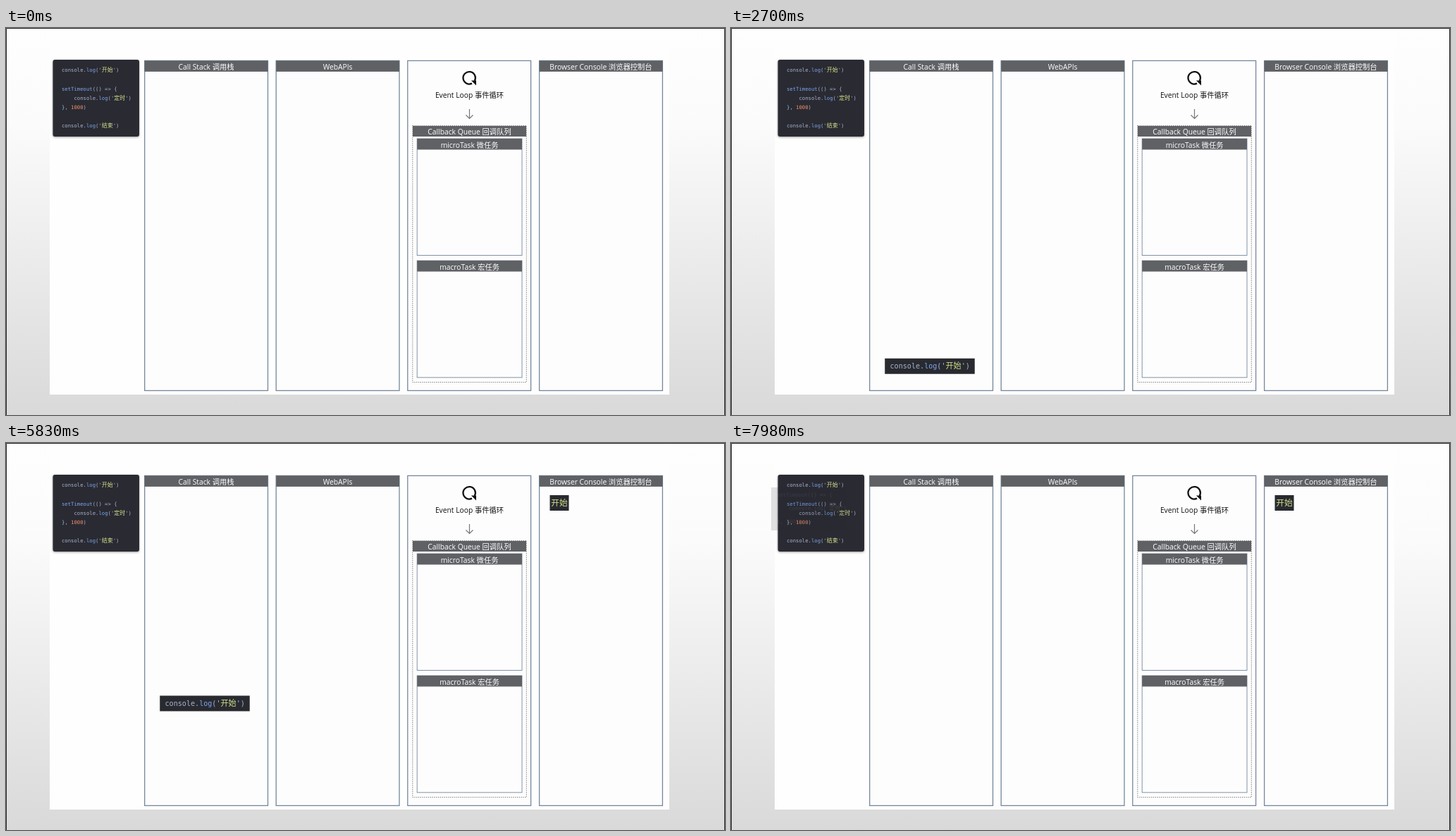
These frames come from a looping animation (1020x549 px, 8 s). An HTML page:

```html
<!DOCTYPE html>
<html lang="zh">
<head>
<meta charset="utf-8">
<style>
  html, body { margin: 0; width: 100%; height: 100%; overflow: hidden; }
  svg { display: block; width: 1020px; height: 549px; }
  text { font: 10.3px "Open Sans", "Noto Sans CJK SC", "Noto Sans CJK", sans-serif; }
  .code text { font: 7.25px "DejaVu Sans Mono", "Noto Sans CJK SC", "Noto Sans CJK", monospace; fill: #a6b3cd; }
  .code.chip text { font-size: 10.1px; }
  .code .fn { fill: #7ba7ee; }
  .code .str { fill: #d3e08c; font-size: 1.1em; }
  .code .quote { fill: #8ccbe8; }
  .code .num { fill: #f08f6c; }
  .box { fill: #fdfdfd; stroke: #75879c; }
  .band { fill: #5f6165; }
  .panel { fill: #292a30; }
</style>
</head>
<body>
<svg id="stage" viewBox="0 0 1020 549"></svg>
<script>
const log = word =>
  `console.<tspan class="fn">log</tspan>(<tspan class="quote">'</tspan><tspan class="str">${word}</tspan><tspan class="quote">'</tspan>)`;
const timer = '<tspan class="fn">setTimeout</tspan>(() =&gt; {';
const timerEnd = '<tspan class="quote">}</tspan>, <tspan class="num">1000</tspan>)';

const rect = (x, y, w, h, cls, extra = '') =>
  `<rect x="${x}" y="${y}" width="${w}" height="${h}" class="${cls}" ${extra}/>`;
const label = (x, y, s, fill = '#fff') =>
  `<text x="${x}" y="${y}" text-anchor="middle" fill="${fill}">${s}</text>`;
const line = (x, y, s) => `<text x="${x}" y="${y}">${s}</text>`;

function titledBox(x, y, w, h, title, strokeWidth) {
  return rect(x, y, w, h, 'box', `stroke-width="${strokeWidth}"`) +
    (title ? rect(x, y, w, 15.5, 'band') + label(x + w / 2, y + 12.5, title) : '');
}

const columns = [[196.7, 'Call Stack 调用栈'], [383.2, 'WebAPIs'], [569.8, ''], [756.6, 'Browser Console 浏览器控制台']];

stage.innerHTML = `
  <defs>
    <linearGradient id="sky" x2="0" y2="1">
      <stop offset="0" stop-color="#fefefe"/>
      <stop offset=".25" stop-color="#fbfbfb"/>
      <stop offset="1" stop-color="#d9d9d9"/>
    </linearGradient>
    <filter id="shade"><feDropShadow dx="0" dy="1" stdDeviation="1.5" flood-opacity=".4"/></filter>
  </defs>
  <rect width="1020" height="549" fill="url(#sky)"/>
  ${rect(62, 1, 879, 519, '', 'fill="#fefefe"')}
  <path d="M.5 549V.5H1019.5V549" fill="none" stroke="#222"/>
  ${columns.map(([x, title]) => titledBox(x, 46.4, 174.8, 468, title, 1.3)).join('')}

  <path d="M661 78.6A8.7 8.7 0 1 1 664.8 75" fill="none" stroke="#111" stroke-width="2.3"/>
  <path d="M660 74.5H667V81.5Z" fill="#111"/>
  ${label(657.5, 98.5, 'Event Loop 事件循环', '#111')}
  <path d="M657.5 115V128.5M652.5 123.5L657.5 128.5L662.5 123.5" fill="none" stroke="#777" stroke-width="1.2"/>
  ${rect(576.8, 138.5, 161.5, 364, '', 'fill="none" stroke="#777" stroke-dasharray="1.3 1.5"')}
  ${rect(577, 139, 161, 15, 'band')}
  ${label(657.5, 151, 'Callback Queue 回调队列')}
  ${titledBox(583.2, 157, 148.8, 165.5, 'microTask 微任务', 0.9)}
  ${titledBox(583.2, 330, 148.8, 165.8, 'macroTask 宏任务', 0.9)}

  <g class="code">
    ${rect(66.5, 45, 122.5, 109, 'panel', 'rx="3" filter="url(#shade)"')}
    ${line(79, 62.4, log('开始'))}
    ${line(79, 88.7, timer)}
    ${line(96.5, 101.8, log('定时'))}
    ${line(79, 115, timerEnd)}
    ${line(79, 141.2, log('结束'))}
  </g>
  <g class="code" id="block">
    ${rect(57, 63, 107, 61, 'panel')}
    ${line(65, 75.5, timer)}
    ${line(82.5, 94.5, log('定时'))}
    ${line(65, 113.5, timerEnd)}
  </g>
  <g class="code chip" id="call">
    ${rect(-63.75, -11, 127.5, 22, 'panel')}
    ${line(-56.5, 3.3, log('开始'))}
  </g>
  <g class="code chip" id="output">
    ${rect(-13.5, -11, 27, 22, 'panel')}
    <text y="4.3" text-anchor="middle"><tspan class="str" style="font-size:11.7px">开始</tspan></text>
  </g>
  <path id="cursor" d="M.5 171V181L2.6 179L4.2 182L5.6 181.4L4.2 178.3H6.6Z" fill="#fff" stroke="#222" stroke-width=".8"/>`;

// Smooth curve through [time, value] points, flat at both ends.
function track(points, t) {
  const last = points.length - 1;
  if (t <= points[0][0]) return points[0][1];
  if (t >= points[last][0]) return points[last][1];
  const i = points.findIndex(p => p[0] > t) - 1;
  const slope = k => k <= 0 || k >= last ? 0 :
    (points[k + 1][1] - points[k - 1][1]) / (points[k + 1][0] - points[k - 1][0]);
  const [t0, a] = points[i], [t1, b] = points[i + 1];
  const d = t1 - t0, u = (t - t0) / d, v = 1 - u;
  return a * (1 + 2 * u) * v * v + b * (3 - 2 * u) * u * u + d * u * v * (slope(i) * v - slope(i + 1) * u);
}

const callMove = {
  x: [[600, 109], [920, 117], [1150, 154], [1350, 217], [1540, 259.5], [1750, 278.5], [2000, 282]],
  y: [[740, 60], [1150, 71], [1350, 98], [1540, 147], [1750, 241], [1960, 330], [2180, 408], [2380, 452], [2570, 474.5], [2750, 480]],
  scale: [[600, .81], [920, .815], [1540, .89], [1750, .96], [2180, .99], [2600, 1]],
  alpha: [[140, 0], [250, .13], [920, .42], [1540, .64], [2100, 1]]
};
const outputMove = {
  x: [[2610, 317], [2900, 334], [3200, 426], [3400, 559.5], [3460, 600.5], [3700, 724], [4000, 779.5], [4230, 785]],
  y: [[3171, 480], [3400, 477.5], [3460, 470.5], [3700, 424], [3950, 302], [4210, 157], [4450, 100], [4690, 85]],
  scale: [[3460, .93], [4690, 1]],
  alpha: [[2610, 0], [3460, .73], [3950, 1]]
};

function place(el, move, t, lift = 0) {
  const at = key => track(move[key], t);
  el.setAttribute('transform', `translate(${at('x')} ${at('y') - lift}) scale(${at('scale')} 1)`);
  el.setAttribute('opacity', at('alpha'));
}

function draw(now) {
  const t = now % 8000;
  place(call, callMove, t, Math.max(0, t - 5395) * 0.2535);
  place(output, outputMove, t);
  block.setAttribute('opacity', t < 7890 ? 0 : (t - 7870) / 110 * 0.13);
  cursor.setAttribute('opacity', t > 550 && t < 1960 ? 1 : 0);
  requestAnimationFrame(draw);
}
const start = performance.now();
(function frame() {
  draw.start = start;
  requestAnimationFrame(function tick(now) { draw(Math.max(0, now - start)); });
})();
</script>
</body>
</html>
```
